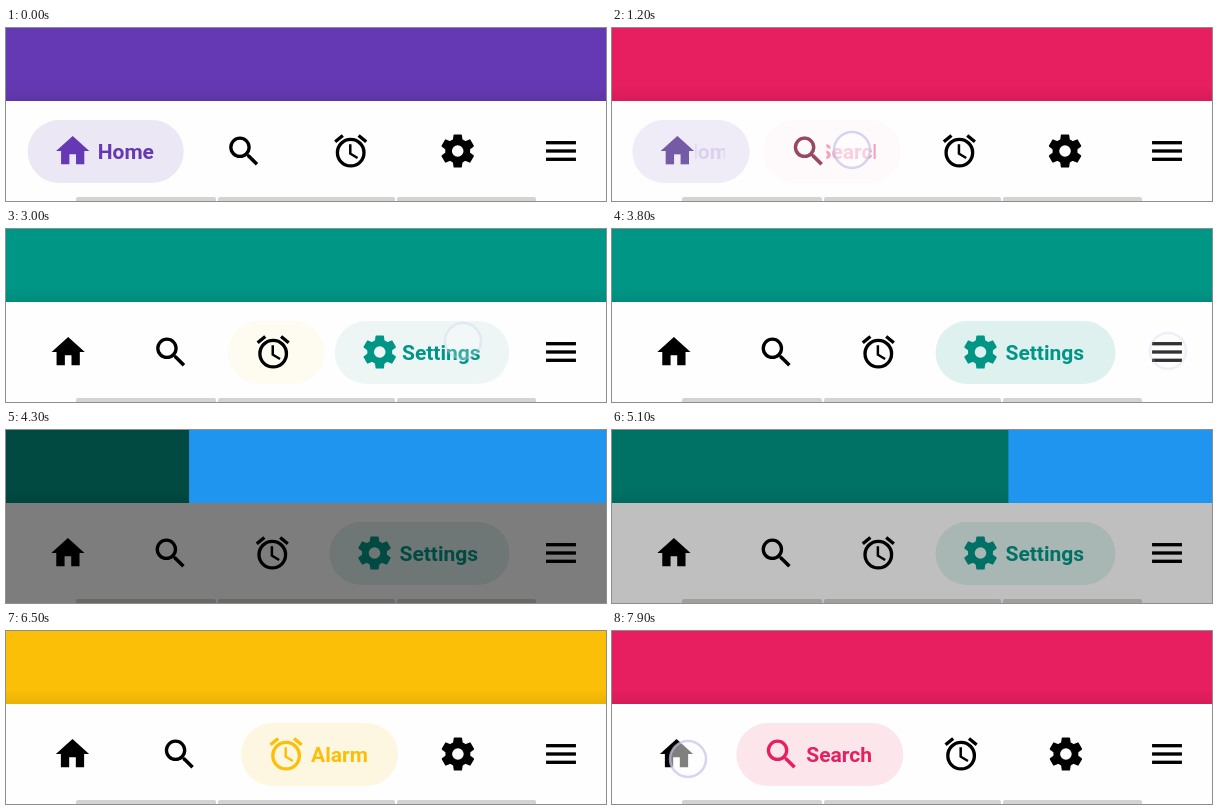
Recreate the animation shown at these times as an HTML page with a canvas. Size 600 by 173 pixels, loop 8 s.

```html
<!DOCTYPE html>
<html lang="en">
<head>
<meta charset="utf-8">
<title>Navigation bar</title>
<style>
  html, body { margin: 0; width: 100%; height: 100%; overflow: hidden; background: #fefefe; }
  canvas { display: block; width: 600px; height: 173px; }
</style>
</head>
<body>
<canvas id="stage" width="600" height="173"></canvas>
<script>
const ctx = document.getElementById('stage').getContext('2d');
const LOOP = 8000;
const BAR_TOP = 73;
const MID_Y = 123;
const ICON_SCALE = 1.66;
const CLOSED_WIDTH = 92;
const TRANSITION = 600;

const tabs = [
  { label: 'Home', width: 156, color: '#6439b3', tint: '#ece7f5', icon: homeIcon },
  { label: 'Search', width: 167, color: '#e71e5f', tint: '#fce6ec', icon: searchIcon },
  { label: 'Alarm', width: 157, color: '#fcbf07', tint: '#fdf7e2', icon: alarmIcon },
  { label: 'Settings', width: 180, color: '#009686', tint: '#dff1ef', icon: gearIcon },
];

// Time in ms and the tab that opens then.
const steps = [[0, 0], [1120, 1], [2170, 2], [2780, 3], [5850, 2], [7120, 1]];

const touches = [
  { x: 240, y: 122, from: 980, to: 1400 },
  { x: 356, y: 119, from: 1980, to: 2450 },
  { x: 457, y: 112, from: 2640, to: 3080 },
  { x: 556, y: 122, from: 3770, to: 4160 },
  { x: 268, y: 122, from: 5680, to: 6100 },
  { x: 175, y: 122, from: 6980, to: 7360 },
  { x: 76, y: 128, from: 7660, to: 8300 },
];

const clamp = v => Math.min(1, Math.max(0, v));

function bezierEase(x1, y1, x2, y2) {
  const curve = (a, b, t) => 3 * (1 - t) ** 2 * t * a + 3 * (1 - t) * t * t * b + t ** 3;
  return x => {
    if (x <= 0 || x >= 1) return clamp(x);
    let low = 0, high = 1;
    for (let i = 0; i < 24; i++) {
      const t = (low + high) / 2;
      if (curve(x1, x2, t) < x) low = t; else high = t;
    }
    return curve(y1, y2, low);
  };
}
const easeOutExpo = bezierEase(0.19, 1, 0.22, 1);
const easeOut = bezierEase(0, 0, 0.58, 1);

// Critically damped spring from 0 to 1.
function spring(ms) {
  const u = 22.4 * Math.max(0, ms) / 1000;
  return 1 - (1 + u) * Math.exp(-u);
}

function homeIcon() {
  ctx.fill(new Path2D('M10 20V14H14V20H19V12H22L12 3L2 12H5V20Z'));
}

function searchIcon() {
  ctx.translate(0.25, 0.25);
  ctx.lineWidth = 2;
  ctx.beginPath();
  ctx.arc(9.5, 9.5, 5.5, 0, 7);
  ctx.stroke();
  ctx.fill(new Path2D('M13.5 14.5L14.5 13.5L15.5 14L20.5 19L19 20.5L14 15.5Z'));
}

function alarmIcon() {
  ctx.lineWidth = 2;
  ctx.beginPath();
  ctx.arc(12, 13, 8, 0, 7);
  ctx.stroke();
  ctx.fill(new Path2D('M12.5 8H11V14L15.75 16.85L16.5 15.62L12.5 13.25Z'));
  ctx.fill(new Path2D('M7.88 3.39L6.6 1.86L2 5.71L3.29 7.24ZM22 5.72L17.4 1.86L16.11 3.39L20.71 7.25Z'));
}

function gearIcon() {
  ctx.translate(12, 12);
  ctx.lineWidth = 4;
  ctx.beginPath();
  ctx.arc(0, 0, 5.5, 0, 7);
  ctx.stroke();
  const tooth = new Path2D('M-3 -6L-2.5 -9.6Q-2.45 -10 -2 -10H2Q2.45 -10 2.5 -9.6L3 -6Z');
  for (let i = 0; i < 6; i++) {
    ctx.fill(tooth);
    ctx.rotate(Math.PI / 3);
  }
}

function menuIcon() {
  for (const y of [6, 11, 16]) ctx.fillRect(3, y, 18, 2);
}

function drawIcon(icon, x, color, alpha = 1) {
  if (alpha <= 0) return;
  ctx.save();
  ctx.globalAlpha = alpha;
  ctx.fillStyle = ctx.strokeStyle = color;
  ctx.translate(x, MID_Y);
  ctx.scale(ICON_SCALE, ICON_SCALE);
  ctx.translate(-12, -12);
  icon();
  ctx.restore();
}

function roundRect(x, y, w, h, r, color) {
  ctx.fillStyle = color;
  ctx.beginPath();
  ctx.roundRect(x, y, w, h, r);
  ctx.fill();
}

function tabStates(time) {
  let current = 0;
  while (current + 1 < steps.length && time >= steps[current + 1][0]) current++;
  const [start, active] = steps[current];
  const previous = current ? steps[current - 1][1] : -1;
  const elapsed = current ? time - start : LOOP;
  const x = clamp(elapsed / TRANSITION);
  const mix = (index, value) => index === active ? value : index === previous ? 1 - value : 0;
  const states = tabs.map((tab, i) => ({
    open: mix(i, easeOutExpo(x)),
    tint: mix(i, easeOut(x)),
    icon: mix(i, clamp(elapsed / 200)),
    text: i === active ? clamp(elapsed / 200) : i === previous ? (1 - x) ** 13 : 0,
  }));
  return { active, states };
}

function drawTab(tab, state, left, width) {
  if (state.tint > 0) {
    ctx.globalAlpha = state.tint;
    roundRect(left, 92, width, 63, 31.5, tab.tint);
    ctx.globalAlpha = 1;
  }
  const missing = tab.width - width;
  drawIcon(tab.icon, left + 45, '#000', 1 - state.icon);
  drawIcon(tab.icon, left + 45, tab.color, state.icon);
  if (state.text > 0.01) {
    ctx.save();
    ctx.beginPath();
    ctx.rect(left + 63, 92, Math.max(0, width - 88), 63);
    ctx.clip();
    ctx.globalAlpha = state.text;
    ctx.fillStyle = tab.color;
    ctx.font = '700 21px Roboto, sans-serif';
    ctx.fillText(tab.label, left + 70 - missing / 2, 131);
    ctx.restore();
  }
}

function drawTabs(states) {
  const widths = tabs.map((tab, i) => CLOSED_WIDTH + (tab.width - CLOSED_WIDTH) * states[i].open);
  const gap = (507 - widths.reduce((a, b) => a + b)) / 5;
  let left = 6.7 + gap;
  tabs.forEach((tab, i) => {
    drawTab(tab, states[i], left, widths[i]);
    left += widths[i] + gap;
  });
}

function drawTouch({ x, y, from, to }, time) {
  const alpha = Math.min(clamp((time - from) / 80), clamp((to - time) / 180));
  if (alpha <= 0) return;
  ctx.globalAlpha = alpha;
  ctx.beginPath();
  ctx.arc(x, y, 18, 0, 7);
  ctx.fillStyle = 'rgba(255,255,255,.5)';
  ctx.fill();
  ctx.lineWidth = 2.5;
  ctx.strokeStyle = 'rgba(198,196,232,.7)';
  ctx.stroke();
  ctx.globalAlpha = 1;
}

function draw(time) {
  const { active, states } = tabStates(time);
  ctx.fillStyle = tabs[active].color;
  ctx.fillRect(0, 0, 600, BAR_TOP);

  const shadow = ctx.createLinearGradient(0, 58, 0, BAR_TOP);
  shadow.addColorStop(0, 'rgba(0,0,0,0)');
  shadow.addColorStop(1, 'rgba(0,0,0,.07)');
  ctx.fillStyle = shadow;
  ctx.fillRect(0, 58, 600, BAR_TOP - 58);

  ctx.fillStyle = '#fefefe';
  ctx.fillRect(0, BAR_TOP, 600, 100);
  for (const [x, w] of [[70, 140], [212, 177], [391, 139]]) roundRect(x, 169, w, 6, 2, '#d3d3d2');
  drawTabs(states);
  drawIcon(menuIcon, 555, '#000');

  const drawer = time < 4900 ? spring(time - 4100) : 1 - spring(time - 5020);
  if (drawer > 0.002) {
    ctx.fillStyle = `rgba(0,0,0,${0.54 * drawer})`;
    ctx.fillRect(0, 0, 600, 173);
    ctx.fillStyle = '#1f95f0';
    ctx.fillRect(600 - 444 * drawer, 0, 444, BAR_TOP);
  }
  for (const touch of touches) drawTouch(touch, time);
}

function frame() {
  draw(performance.now() % LOOP);
  requestAnimationFrame(frame);
}
frame();
</script>
</body>
</html>
```
